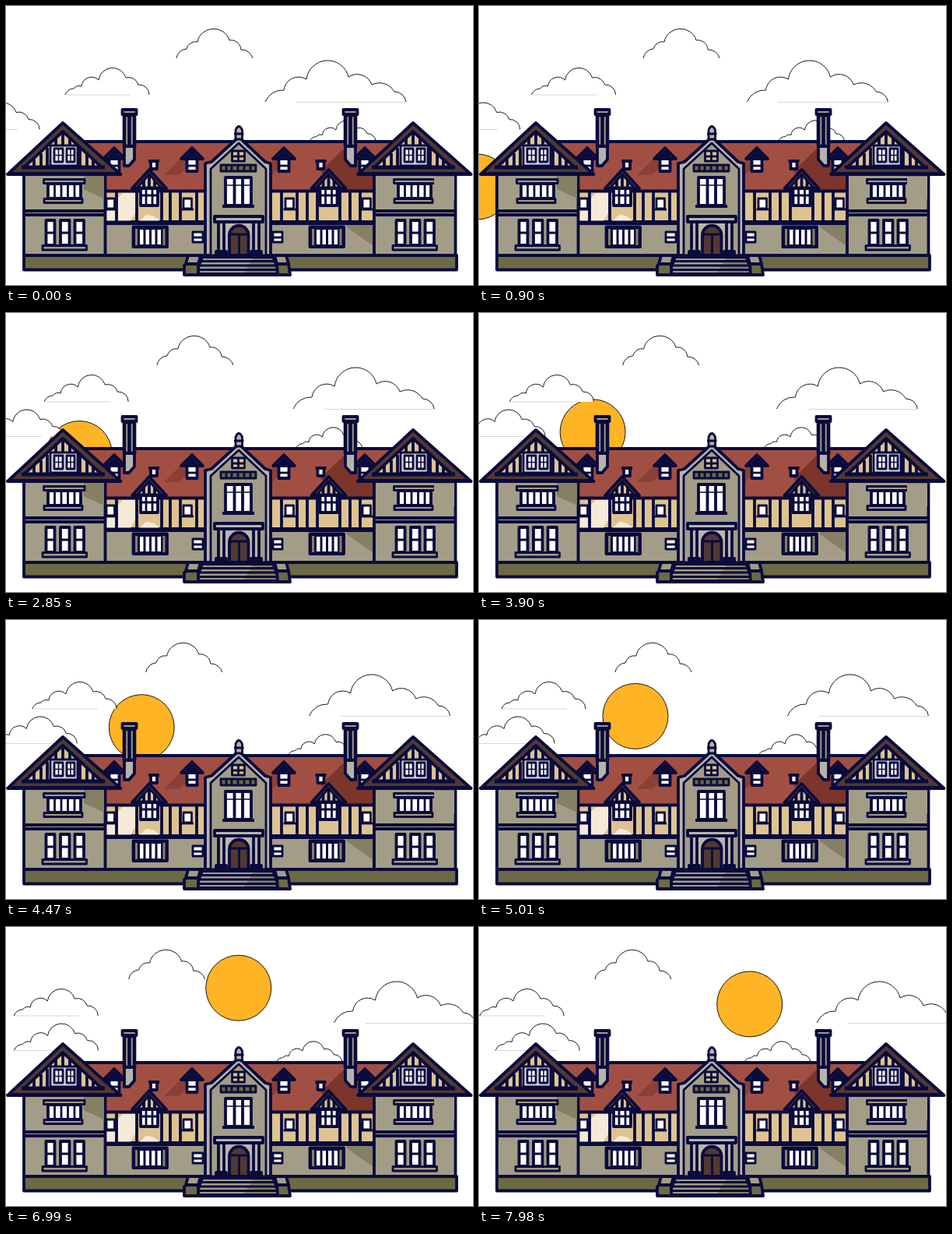
An HTML page for the animation above (8 s loop, 600 by 358 pixels).

```html
<!DOCTYPE html>
<html lang="en">
<head>
<meta charset="utf-8">
<title>Manor house</title>
<style>
  html, body { margin: 0; width: 100%; height: 100%; overflow: hidden; background: #fff; }
  svg { display: block; width: 100vw; height: 100vh; }
  .sky { fill: #fff; stroke: #000; stroke-width: .9; }
  .base { stroke: #bbb; stroke-width: .6; }
  .house { stroke: #090b3d; stroke-width: 3.8; stroke-linejoin: round; }
  .flat { stroke: none; }
  .stone { fill: #a39d87; }
  .pale { fill: #b7b3ab; }
  .cream { fill: #dec391; }
  .pane { fill: #fff; }
  .navy { fill: #090b3d; }
  .olive { fill: #6c6944; }
  .brown { fill: #513832; }
  .shade { fill: #857f64; }
  .line { fill: none; }
  .thin { stroke-width: 2.8; }
  .fine { stroke-width: 1.6; }
</style>
</head>
<body>
<svg viewBox="0 0 600 358">
  <defs>
    <path id="puff" vector-effect="non-scaling-stroke" d="M0 0A12 12 0 0 1 11-8A9 9 0 0 1 21-11A13 13 0 0 1 43-19A18 18 0 0 1 78-22A13 13 0 0 1 94-13A13 13 0 0 1 108 0"/>

    <g id="wing">
      <path class="stone" d="M23 214H127.500V320H23Z"/>
      <path class="flat shade" d="M100 218H126V247L100 235Z"/>
      <path class="line" d="M23 263H127M23 268H127"/>
      <path class="pane" d="M54 228H96V247H54Z"/>
      <path class="line thin" d="M62.500 228V247M71 228V247M79.500 228V247M88 228V247"/>
      <path class="stone thin" d="M48.500 222.500H101V227.500H48.500ZM49 247.500H98V252.500H49Z"/>
      <path class="pane" d="M51.500 275H62.500V307H51.500ZM70 275H81.500V307H70ZM88.500 275H100V307H88.500Z"/>
      <path class="line thin" d="M52 291H62M70 291H81M89 291H100"/>
      <path class="stone thin" d="M47 307.500H103.500V313H47Z"/>
      <path class="brown" d="M73 150L2 216H147.500Z"/>
      <path class="cream" d="M73 161L23 207H123Z"/>
      <path class="line" d="M73 161V180M64 170V180M82 170V180M45 189V206M53 182V206M95 182V206M104 189V206M36 196V206M112 196V206"/>
      <path fill="#d7d5df" class="thin" d="M57 179H92V205H57Z"/>
      <path class="pane thin" d="M62 183H73V200H62ZM78 183H88V200H78Z"/>
      <path class="line fine" d="M62 191.500H73M78 191.500H88M67.500 183V200M83 183V200"/>
      <path class="line" stroke-width="5" d="M20 207H127M3 215.500H147"/>
    </g>

    <g id="dormer">
      <path class="pane" d="M-6.500 14H6.500V31H-6.500Z"/>
      <path class="line thin" d="M-7 24H7"/>
      <path class="brown" d="M0 1L-14 15H14Z"/>
      <path class="navy" d="M0 6L-7 14H7Z"/>
    </g>

    <g id="vent">
      <path class="pane" d="M-4 0H4V10H-4Z"/>
      <path class="line" d="M-7 0H7"/>
    </g>

    <g id="chimney">
      <path class="stone" stroke-width="4.600" d="M-6 140H7V180H-6ZM.5 140V180"/>
      <path class="pale" d="M-6 180H7V197L0 205H-6Z"/>
      <path class="stone" d="M-8.500 133H9.500V139H-8.500Z"/>
    </g>

    <g id="oriel">
      <path class="pane" d="M-11 233H11V256H-11Z"/>
      <path class="line thin" d="M-4 233V256M4 233V256M-11 243H11"/>
      <path class="brown" d="M0 210L-22 234H22Z"/>
      <path class="cream thin" d="M0 216L-15 233H15Z"/>
      <path class="line" d="M0 215V234M-7 223V234M7 223V234M-22 234H22"/>
    </g>

    <g id="bay">
      <path class="navy" d="M-21.500 283.500H22V309H-21.500Z"/>
      <path class="flat shade" d="M-19 286H-16V307H-19ZM16.500 286H19.500V307H16.500Z"/>
      <path class="flat pane" d="M-13 287H-8.500V306H-13ZM-5.500 287H-1V306H-5.500ZM2 287H6.500V306H2ZM9.500 287H14V306H9.500Z"/>
    </g>

    <g id="sash">
      <path class="pane thin" d="M-5 247H5.500V260H-5Z"/>
      <path class="line thin" d="M-7.500 261H8"/>
    </g>
  </defs>

  <circle id="sun" r="42" fill="#feb424" stroke="#161616" stroke-width="1"/>
  <g class="sky">
    <path class="cloud" data-speed="-8.78" d="M219 67A14 14 0 0 1 232 55A12 12 0 0 1 246 46A21 20 0 0 1 287 44A13 13 0 0 1 302 56A15 15 0 0 1 317 67"/>
    <g class="cloud" data-speed="-9.4"><use href="#puff" x="76" y="114"/><path class="base" d="M78 114H160"/></g>
    <g class="cloud" data-speed="12.66"><path d="M333 123A24 24 0 0 1 357 108A19 19 0 0 1 386 94A27.500 27.500 0 0 1 440 91A20 20 0 0 1 470 101A22 22 0 0 1 499 110A15 15 0 0 1 514 123"/><path class="base" d="M373 123.500H514"/></g>
    <g class="cloud" data-speed="-6.14"><use href="#puff" transform="translate(390 174) scale(.787)"/></g>
    <g class="cloud" data-speed="10.8"><use href="#puff" x="-65" y="158.500"/><path class="base" d="M-63 158.500H15"/></g>
  </g>

  <g class="house">
    <path fill="#a14f43" d="M100 174H498V238H100Z"/>
    <path class="flat" fill="#7b352b" d="M436 181L404 212L430 236H472V190H448Z"/>
    <path class="flat" fill="#8a4036" d="M231 189L203 217H222L234 206ZM349 189L342 196V217L352 206Z"/>

    <path class="cream" d="M127 237.500H473V277H127Z"/>
    <path class="flat" fill="#f5ead7" d="M150 240H168V262L160 276H128V262ZM171 276L180 268Q192 268 197 276Z"/>
    <path class="stone" d="M127 279H473V320H127Z"/>
    <path class="flat shade" d="M438 284L472 308V281H438Z"/>
    <path class="line" d="M142 238V277M168 238V277M200 238V277M211 238V277M224 238V277M245 238V277M354 238V277M374 238V277M387 238V277M400 238V277M429 238V277M442 238V277M455 238V277"/>
    <path class="line" stroke-width="5" d="M127 278H256M340 278H473"/>

    <use href="#sash" x="134"/><use href="#sash" x="233"/><use href="#sash" x="364"/><use href="#sash" x="463"/>
    <path class="pane thin" d="M240 290H253V303H240ZM343 290H355V303H343ZM240 297H253M343 297H355"/>
    <use href="#bay" x="185"/><use href="#bay" x="412"/>
    <use href="#dormer" x="139" y="181"/><use href="#dormer" x="239" y="181"/><use href="#dormer" x="357" y="181"/><use href="#dormer" x="461" y="181"/>
    <use href="#vent" x="190" y="199"/><use href="#vent" x="404.500" y="199"/>
    <use href="#oriel" x="184"/><use href="#oriel" x="414.500"/>
    <use href="#chimney" x="158"/><use href="#chimney" transform="translate(443) scale(-1 1)"/>

    <path class="olive" d="M23 320H579V338.500H23Z"/>
    <use href="#wing"/><use href="#wing" x="450"/>
    <path class="flat stone" d="M550 219H576V248H550Z"/>

    <path class="pale" d="M256 320V202L264 200L299 168L333 200L340 202V320Z"/>
    <path class="stone thin" d="M263 320V209L299 176L334 209V320Z"/>
    <path class="pale thin" d="M295 171V159Q299 150 303.500 159V171ZM293 164H305.500"/>
    <path class="cream thin" d="M290.500 186H306.500V199H290.500ZM298.500 186V199M290.500 193H306.500"/>
    <path class="olive thin" d="M276 204H321V212H276ZM283 204V212M290 204V212M298 204V212M306 204V212M314 204V212"/>
    <path class="pane" d="M282 220H315V256H282Z"/>
    <path class="line" d="M293.500 220V256M304 220V256M278 257H319"/>
    <path class="line fine" d="M282 230H315"/>
    <path class="flat" fill="#bfb4aa" d="M280 278H318V319H280Z"/>
    <path class="pale" d="M273 277H280V319H273ZM318 277H325V319H318ZM268 270H330V277H268ZM270 315H283V320H270ZM315 315H328V320H315Z"/>
    <path class="brown" d="M287 320V294A12 12 0 0 1 311.500 294V320Z"/>
    <path class="line thin" d="M299.500 293V320M289 293H310"/>

    <path class="stone" d="M252 322H343L352 344H244Z"/>
    <path class="flat olive" d="M317 324H342L348 342H306Z" opacity=".55"/>
    <path class="line thin" d="M251 327.500H345M249 333H347M247 338.500H349"/>
    <path class="olive" d="M232 331H247V345H229V333ZM348 331H363L365 345H349Z"/>
    <path class="stone" d="M234 320H250L247 331H231ZM345 320H360L363 331H348Z"/>
    <path class="line" d="M229 345H365"/>
  </g>
</svg>
<script>
  const LOOP = 8000;
  const sun = document.getElementById('sun');
  const clouds = document.querySelectorAll('.cloud');

  // The sun climbs and descends in straight lines joined by a rounded peak.
  function sunHeight(t) {
    const round = 0.47;
    const d = Math.abs(t - 6.96);
    return 72 + 26.4 * (d < round ? (d * d + round * round) / (2 * round) : d);
  }

  function draw(now) {
    const t = (now % LOOP) / 1000;
    sun.setAttribute('transform', `translate(${-46.6 + 49.4 * t} ${sunHeight(t)})`);
    for (const cloud of clouds) {
      cloud.setAttribute('transform', `translate(${cloud.dataset.speed * t} 0)`);
    }
    requestAnimationFrame(draw);
  }
  draw(0);
</script>
</body>
</html>
```
